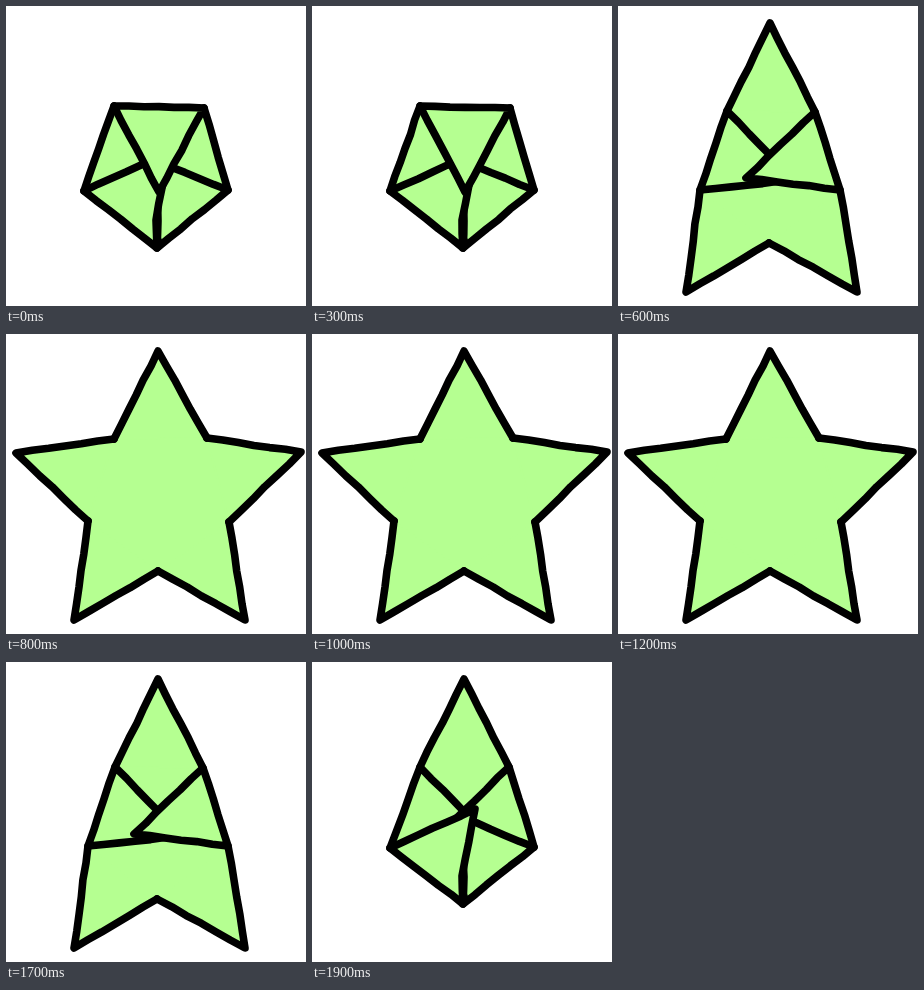
These frames come from a looping animation (300x300 px, 2000 ms). An HTML page:

```html
<!DOCTYPE html>
<html lang="en">
<head>
<meta charset="utf-8">
<title>Folding star</title>
<style>
  html, body { margin: 0; width: 100%; height: 100%; overflow: hidden; background: #fff; }
  svg { display: block; width: 100%; height: 100%; }
  path { stroke: #000; stroke-width: 7.6; stroke-linejoin: round; stroke-linecap: round; }
  .body { stroke: #b5ff91; stroke-width: 2; }
  .crease { stroke-width: 3; }
</style>
</head>
<body>
<svg viewBox="0 0 300 300"><g id="star"></g></svg>
<script>
const GREEN = '#b5ff91';
const STEP = 100;
// One digit per step: how many arms are unfolded.
const POSES = '00001234555555554321';

// Inner corners: top left, top right, right, bottom, left.
const CLOSED = [[108, 100], [198, 102], [222, 184], [151, 242], [78, 185]];
const FOLDED = [[108, 105], [197, 105], [222, 185], [151, 242], [78, 186]];
const HALF = [[109, 105], [197, 106], [222, 184], [151, 237], [82, 184]];
const OPEN = [[108, 105], [201, 104], [223, 188], [152, 237], [82, 187]];
const CORNERS = [CLOSED, FOLDED, FOLDED, HALF, OPEN, OPEN];

// Arms from the lowest layer up; rank = place in the unfolding order.
const ARMS = [
  { from: 4, to: 0, rank: 5, out: [[10, 119]], fold: [[176, 174]] },
  { from: 1, to: 2, rank: 4, out: [[295, 118]], fold: [[128, 172]] },
  { from: 2, to: 3, rank: 3, out: [[239, 286]], fold: [[150, 155], [152, 215]] },
  { from: 3, to: 4, rank: 2, out: [[68, 286]], fold: [[150, 214], [163, 147]] },
  { from: 0, to: 1, rank: 1, out: [[152, 17]], fold: [[153, 186]] }
];

const star = document.getElementById('star');

function random(seed) {
  return () => {
    seed = (seed * 16807) % 2147483647;
    return seed / 2147483647;
  };
}

// A polyline with the small tremble of a hand-drawn stroke.
function sketch(points, rnd) {
  let d = 'M' + points[0];
  for (let i = 1; i < points.length; i++) {
    const [x0, y0] = points[i - 1], [x1, y1] = points[i];
    const length = Math.hypot(x1 - x0, y1 - y0);
    const parts = Math.max(1, Math.round(length / 16));
    for (let k = 1; k <= parts; k++) {
      const t = k / parts;
      const off = k < parts ? rnd() - 0.5 : 0;
      const x = x0 + (x1 - x0) * t - (y1 - y0) / length * off;
      const y = y0 + (y1 - y0) * t + (x1 - x0) / length * off;
      d += `L${x.toFixed(1)} ${y.toFixed(1)}`;
    }
  }
  return d;
}

const shape = (d, fill = GREEN, name = '') => `<path d="${d}" fill="${fill}" class="${name}"/>`;

function drawing(pose, variant) {
  const rnd = random(4711 + pose * 977 + variant * 131);
  const corners = CORNERS[pose];
  const isOut = arm => arm.rank <= pose;
  const outline = arm => [corners[arm.from], ...(isOut(arm) ? arm.out : arm.fold), corners[arm.to]];
  const open = ARMS.filter(isOut).map(arm => sketch(outline(arm), rnd));

  // Fill the arms and the body first, so that no seams show between them.
  let html = open.map(d => shape(d, GREEN, 'body')).join('');
  html += shape('M' + corners.join('L') + 'Z', GREEN, 'body');
  html += open.map(d => shape(d, 'none')).join('');

  for (const arm of ARMS.filter(a => !isOut(a))) {
    const line = outline(arm);
    html += shape(sketch([...line, line[0]], rnd) + 'Z');
    // The thick crease where both lower arms meet.
    if (arm.rank === 2) html += shape('M150 222L155 236L149 238Z', '#000', 'crease');
  }
  return html;
}

let shown = '';

function render(time) {
  const step = Math.floor(time / STEP) % POSES.length;
  const pose = +POSES[step];
  const variant = pose % 5 ? 0 : step % 2;
  const key = pose + '/' + variant;
  if (key === shown) return;
  shown = key;
  star.innerHTML = drawing(pose, variant);
}

const start = performance.now();

function tick() {
  render(performance.now() - start);
  requestAnimationFrame(tick);
}

tick();
</script>
</body>
</html>
```
